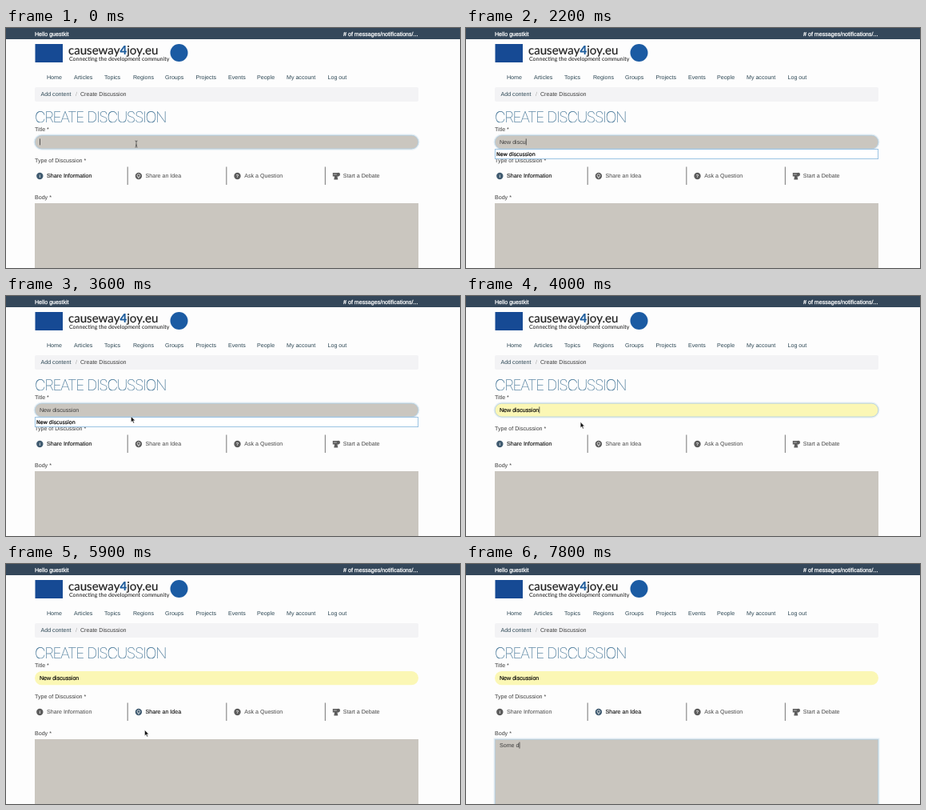
Recreate the animation shown at these times as an HTML page. Size 568 px wide and 300 px high, loop 8000 ms.

```html
<!DOCTYPE html>
<html lang="en">
<head>
<meta charset="utf-8">
<title>Create discussion</title>
<style>
  html, body { margin: 0; width: 100%; height: 100%; overflow: hidden; background: #fdfdfd; }
  svg { display: block; width: 568px; height: 300px; }
  text { font: 7.1px "Liberation Sans", Arial, sans-serif; fill: #3a3a3a; white-space: pre; text-rendering: geometricPrecision; }
  .medium { stroke: currentColor; stroke-width: .2px; }
  .bar text { fill: #fff; color: #fff; stroke-width: .25px; }
  .nav text { fill: #2b4653; }
  .brand { font: 15.1px Lato, sans-serif; fill: #222; stroke: #222; stroke-width: .2px; }
  .brand tspan { fill: #1c5c9c; stroke: #1c5c9c; font-weight: 700; }
  .tagline { font: 7px Lato, sans-serif; fill: #111; }
  .heading { font: 100 18.8px Inter, sans-serif; letter-spacing: -1.35px; fill: #2a6288; stroke: #2a6288; stroke-width: .12px; }
  .list text { font: 6.35px "DejaVu Sans", sans-serif; fill: #000; color: #000; }
  .type text { fill: #444; }
  .type .icon { fill: #5c5c5c; }
  .type .mark { font: 700 5.5px "Liberation Sans", sans-serif; fill: #fff; text-anchor: middle; }
  .type.on .label { fill: #111; stroke: #111; stroke-width: .12px; }
  .type.on .icon { fill: #405b70; }
  .filled { fill: #000; stroke: #000; stroke-width: .15px; }
  .glow { fill: none; stroke: #b4cfe2; }
  .caret { stroke: #333; stroke-width: .8px; }
</style>
</head>
<body>
<svg viewBox="0 0 568 300">
  <rect width="568" height="300" fill="#fdfdfd"/>
  <g class="bar">
    <rect width="568" height="14" fill="#34475a"/>
    <text class="medium" x="36" y="9.8">Hello guestkit</text>
    <text class="medium" x="515.5" y="9.8" text-anchor="end"># of messages/notifications/...</text>
  </g>
  <rect x="36.5" y="20" width="34.5" height="23" fill="#164a94"/>
  <text class="brand" x="78" y="33">causeway<tspan>4</tspan>joy.eu</text>
  <text class="tagline" x="79" y="41">Connecting the development community</text>
  <circle cx="216.5" cy="31" r="11" fill="#1b5ba3"/>
  <g class="nav" id="nav"></g>
  <rect x="36" y="74" width="480" height="18" rx="2" fill="#f3f3f5"/>
  <text x="43.5" y="85.2" style="fill:#2b4653">Add content</text>
  <text x="87" y="85.2" style="fill:#aaa">/</text>
  <text x="93" y="85.2">Create Discussion</text>
  <text class="heading" x="36" y="118">CREATE DISCUSSION</text>
  <text x="36" y="128.8">Title *</text>
  <text x="36" y="168.3">Type of Discussion *</text>
  <text x="36" y="213.8">Body *</text>
  <g id="types"></g>

  <rect id="field" x="36" y="134" width="480" height="17.2" rx="8.6"/>
  <g id="titleGlow" class="glow">
    <rect x="35.5" y="133.5" width="481" height="18.2" rx="9.1" stroke-width="2" opacity=".3"/>
    <rect x="36.2" y="134.2" width="479.6" height="16.8" rx="8.4" stroke-width=".8"/>
  </g>
  <text id="title" x="42" y="145"></text>

  <rect x="36" y="219" width="480" height="90" fill="#cac6bf"/>
  <g id="bodyGlow" class="glow">
    <rect x="35.5" y="218.5" width="481" height="92" stroke-width="2" opacity=".3"/>
    <rect x="36.2" y="219.2" width="479.6" height="92" stroke-width=".8"/>
  </g>
  <text id="body" x="42" y="229.3"></text>

  <g id="list" class="list">
    <rect id="listBox" x="36.4" y="151.6" width="479.2" fill="#fff" stroke="#8fbce0" stroke-width=".9"/>
    <text class="medium" x="38" y="160">New discussion</text>
    <text class="medium" id="second" x="38" y="172.2">New Event</text>
  </g>
  <path id="caret" class="caret" d="M0 0V8"/>
  <path id="beam" d="M-1.5-4Q0-4 0-3Q0-4 1.5-4M0-3V3M-1.5 4Q0 4 0 3Q0 4 1.5 4M-1 1.5H1" fill="none" stroke="#333" stroke-width=".7"/>
  <path id="arrow" d="M0 0V7.2L1.7 5.7L2.9 8.4L4.1 7.9L2.9 5.3H5.1Z" fill="#111" stroke="#fff" stroke-width=".5"/>
</svg>
<script>
const LOOP = 8000;
const $ = id => document.getElementById(id);
const el = Object.fromEntries(
  ['field', 'titleGlow', 'title', 'bodyGlow', 'body', 'list', 'listBox', 'second', 'caret', 'beam', 'arrow']
    .map(id => [id, $(id)]));
const show = (node, on) => node.setAttribute('visibility', on ? 'visible' : 'hidden');
const move = (node, x, y) => node.setAttribute('transform', `translate(${x} ${y})`);

$('nav').innerHTML = [
  ['Home', 51], ['Articles', 85], ['Topics', 123], ['Regions', 159], ['Groups', 199],
  ['Projects', 237.5], ['Events', 278], ['People', 314], ['My account', 351], ['Log out', 402.5]
].map(([name, x]) => `<text x="${x}" y="63.5">${name}</text>`).join('');

const disc = mark => `<circle class="icon" cx="42.3" cy="185" r="4.2"/><text class="mark" x="42.3" y="187">${mark}</text>`;
const bulb = `<circle class="icon" cx="42.3" cy="185" r="4.2"/>
  <path d="M41.2 186.2Q39.8 184.4 41 183.2Q42.3 182.2 43.6 183.2Q44.8 184.4 43.4 186.2ZM41.5 187.3H43.1" fill="none" stroke="#fff" stroke-width=".7"/>`;
const stand = `<path class="icon" d="M38 181H45.5V185.5H43.7L44.5 189.5H39.5L40.3 185.5H38Z"/><circle class="icon" cx="45" cy="183" r="2.2"/>
  <path d="M39 183H43" stroke="#ddd" stroke-width=".7"/>`;
$('types').innerHTML = [
  ['Share Information', disc('i')], ['Share an Idea', bulb], ['Ask a Question', disc('?')], ['Start a Debate', stand]
].map(([name, icon], i) => `<g class="type" transform="translate(${i * 123.6} 0)">
  ${i ? '<path d="M28.6 173.5V196" stroke="#8c8c8c" stroke-width="1.2"/>' : ''}
  ${icon}<text class="label" x="51" y="187">${name}</text></g>`).join('');
const types = document.querySelectorAll('.type');

// Moments at which each further character appears
const TITLE = 'New discussion';
const titleKeys = [100, 200, 300, 500, 1400, 1600, 1800, 2000, 2200, 2250, 2300, 2400, 2600, 2700];
const BODY = 'Some d';
const bodyKeys = [7000, 7100, 7300, 7400, 7600, 7800];
const ACCEPT = 3900, PICK = 5200, BODY_CLICK = 6500;
const caretResets = [0, ...titleKeys, ACCEPT, BODY_CLICK, ...bodyKeys];

// Pointer path: time, x, y
const path = [
  [3400, 163, 145], [3500, 163, 146], [3700, 150, 155], [4000, 143.2, 157.5], [4300, 146, 164],
  [5000, 187, 184], [5300, 187, 185], [5800, 174, 206.5], [6000, 173, 208.5], [6300, 157, 231], [8000, 157, 231]
];

function pointer(t) {
  if (t < path[0][0]) return [163, 145];
  const i = path.findIndex(p => p[0] > t);
  const [t0, x0, y0] = path[i - 1], [t1, x1, y1] = path[i];
  const k = (t - t0) / (t1 - t0), e = k * k * (3 - 2 * k);
  return [x0 + (x1 - x0) * e, y0 + (y1 - y0) * e];
}

const typed = (text, keys, t) => text.slice(0, keys.filter(k => k <= t).length);

function draw(t) {
  const title = typed(TITLE, titleKeys, t), body = typed(BODY, bodyKeys, t);
  const filled = t >= 3700, inTitle = t < PICK, inBody = t >= BODY_CLICK;
  el.title.textContent = title;
  el.title.setAttribute('class', filled ? 'filled' : '');
  el.body.textContent = body;
  el.field.setAttribute('fill', filled ? '#fbf7b5' : '#cac6bf');
  show(el.titleGlow, inTitle);
  show(el.bodyGlow, inBody);

  const both = title.length < 5, open = title && t < ACCEPT;
  show(el.list, open);
  show(el.second, open && both);
  el.listBox.setAttribute('height', both ? 24.4 : 12);

  types.forEach((node, i) => node.classList.toggle('on', i === (t < PICK ? 0 : 1)));

  const last = Math.max(...caretResets.filter(k => k <= t));
  const lit = Math.floor((t - last) / 500) % 2 === 0;
  const box = inBody ? el.body : el.title;
  show(el.caret, lit && (inTitle || inBody));
  move(el.caret, 42.5 + (box.textContent ? box.getComputedTextLength() : 0), inBody ? 222.6 : 138.4);

  const [x, y] = pointer(t);
  const beam = t < 100 || (t >= 3400 && t < 3600) || (t >= 6150 && t < 7000);
  show(el.beam, beam);
  show(el.arrow, t >= 3600 && t < 6150);
  move(el.beam, x, y);
  move(el.arrow, x, y);
}

const start = performance.now();
function tick() {
  draw((performance.now() - start) % LOOP);
  requestAnimationFrame(tick);
}
draw(0);
requestAnimationFrame(tick);
</script>
</body>
</html>
```
